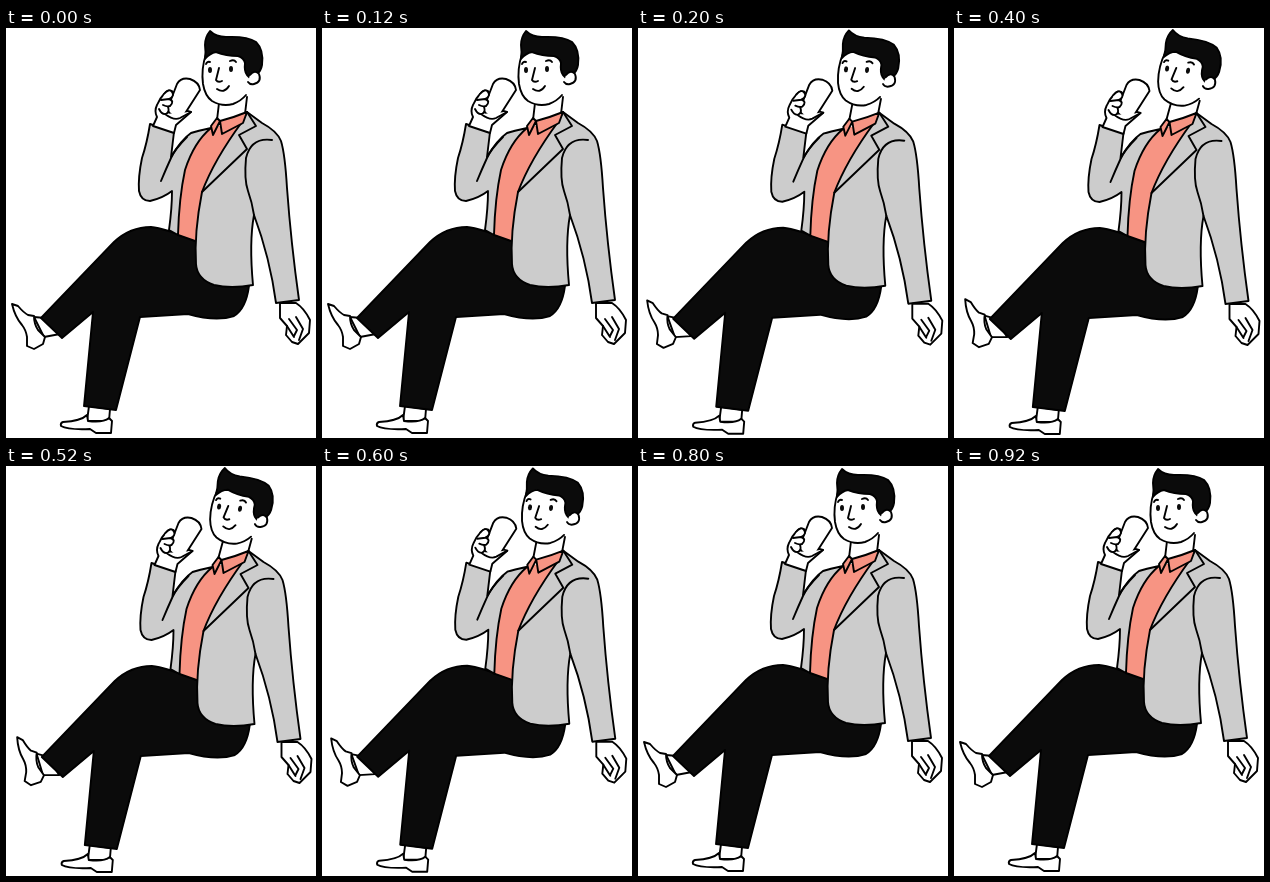
Recreate the animation shown at these times as an HTML page. Size 310 by 410 pixels, loop 1 s.

```html
<!DOCTYPE html>
<html lang="en">
<head>
<meta charset="utf-8">
<title>Man with a cup</title>
<style>
html, body { margin: 0; width: 100%; height: 100%; overflow: hidden; background: #fff; }
svg { display: block; width: 100%; height: 100%; }
.line { fill: none; stroke: #000; stroke-width: 1.9; stroke-linecap: round; stroke-linejoin: round; }
.skin { fill: #fff; }
.coat { fill: #ccc; }
.shirt { fill: #f79483; }
.black { fill: #0b0b0b; }
</style>
</head>
<body>
<svg viewBox="0 0 310 410">
  <g id="man" class="line">
    <g id="foot" class="skin">
      <path d="M39 290L28 289L38 309L54 306Z"/>
      <path d="M6 276L12 278Q18 285 22 287L28 288Q28 296 32 302L39 309L37 316L28 321L21 318L21 309Q20 302 16 297Q9 289 6 276Z"/>
    </g>

    <g class="skin">
      <path d="M83 378L81 393L103 393L104 381Z"/>
      <path d="M81 387Q75 393 57 394Q54 395 55 398Q62 402 84 401L90 405L105 405L106 393L103 390Q97 395 82 393Z"/>
    </g>

    <path class="black" d="M35 290L108 214Q124 199 145 199Q158 200 190 213L243 258Q240 281 228 288Q210 294 182 286L134 289L110 382L78 378L87 284L56 310Z"/>

    <g id="torso">
      <g id="head">
        <path class="skin" stroke="none" d="M213 72L210 93L222 103L240 88L241 55Z"/>
        <path d="M213 75L211 92M241 69L239 86"/>
        <path class="skin" d="M200 26Q195 41 197 56Q199 68 206 73Q216 79 227 76Q238 72 242 62L246 51L240 30Z" stroke="none"/>
        <path d="M200 26Q195 41 197 56Q199 68 206 73Q216 79 227 76Q235 73 240 67"/>
        <path class="black" d="M204 3Q210 9 220 9Q241 8 250 14Q258 22 256 37Q255 43 251 46Q246 43 244 50L241 47Q238 43 239 35Q238 30 232 28Q220 28 210 24Q204 25 199 31Q200 24 199 17Q199 9 204 3Z"/>
        <path class="skin" d="M244 47Q249 41 253 46Q256 54 248 56Q244 57 242 54"/>
        <g class="black" stroke="none">
          <ellipse cx="204" cy="42" rx="2" ry="3"/>
          <ellipse cx="225" cy="41" rx="2" ry="3"/>
        </g>
        <path d="M200 36Q201 33 204 34M224 33Q228 31 230 34M213 40L210 52Q212 55 216 53M211 61Q218 66 223 58"/>
      </g>

      <path class="shirt" stroke="none" d="M206 98L181 120L170 206L190 213L200 164L242 98L240 84L217 98Z"/>
      <path d="M172 207L189 213"/>
      <path class="coat" d="M205 100Q191 103 185 105Q175 112 165 129L168 104L144 96Q141 115 136 130Q132 149 133 163Q135 173 144 173Q157 170 166 163Q166 180 163 202L172 207Q173 170 179 142Q188 114 205 100Z"/>
      <path d="M181 109Q169 121 165 130Q160 141 155 153"/>

      <path class="coat" d="M241 84L256 95Q271 103 275 113Q279 126 281 160Q285 215 293 272L270 275Q264 230 248 187Q243 214 247 257Q225 261 208 257Q191 251 190 236Q188 205 196 164Q208 132 236 94Z"/>
      <path d="M241 84L250 98L233 107L241 121L196 164M266 112Q245 109 240 130Q238 152 242 163Q246 174 248 187"/>
      <path class="shirt" d="M211 90L205 98L207 107L214 93L216 106L237 95L241 84Q229 89 214 93Z"/>

      <g class="skin">
        <path d="M274 275L274 290L281 298L280 307L286 314L292 316L303 305L304 292Q298 280 290 275Z"/>
        <path d="M283 291L291 302L288 308M290 289L297 301L293 312M281 298L288 309"/>
        <path d="M147 98L151 89Q148 83 151 77Q154 70 158 66Q162 61 166 63L178 82L185 84L170 97L168 105Z"/>
        <path d="M171 56Q175 49 184 51Q193 54 194 62L178 87Q168 92 161 82Z"/>
        <path d="M158 66Q163 60 166 64Q169 68 163 71Q169 73 164 78Q161 79 157 77M163 71L155 72M162 79Q164 84 160 86Q156 87 153 81M159 86Q168 93 174 90L185 84"/>
      </g>
    </g>
  </g>
</svg>
<script>
const poses = [
  { x: 0, y: 0, lean: 0, head: 0, foot: 0 },
  { x: .2, y: .7, lean: .1, head: 4.2, foot: 7 },
  { x: .8, y: 1, lean: .7, head: 8.5, foot: 10 }
];
const order = [0, 1, 2, 1, 0];
const HOLD = 200;
const move = (id, value) => document.getElementById(id).setAttribute("transform", value);

function draw(now) {
  const p = poses[order[Math.floor(now / HOLD) % order.length]];
  move("man", `translate(${p.x} ${p.y})`);
  move("torso", `translate(${p.lean} 0)`);
  move("head", `rotate(${p.head} 224 92)`);
  move("foot", `rotate(${p.foot} 42 298)`);
}

const start = performance.now();
function tick() {
  draw(performance.now() - start);
  requestAnimationFrame(tick);
}
tick();
</script>
</body>
</html>
```
